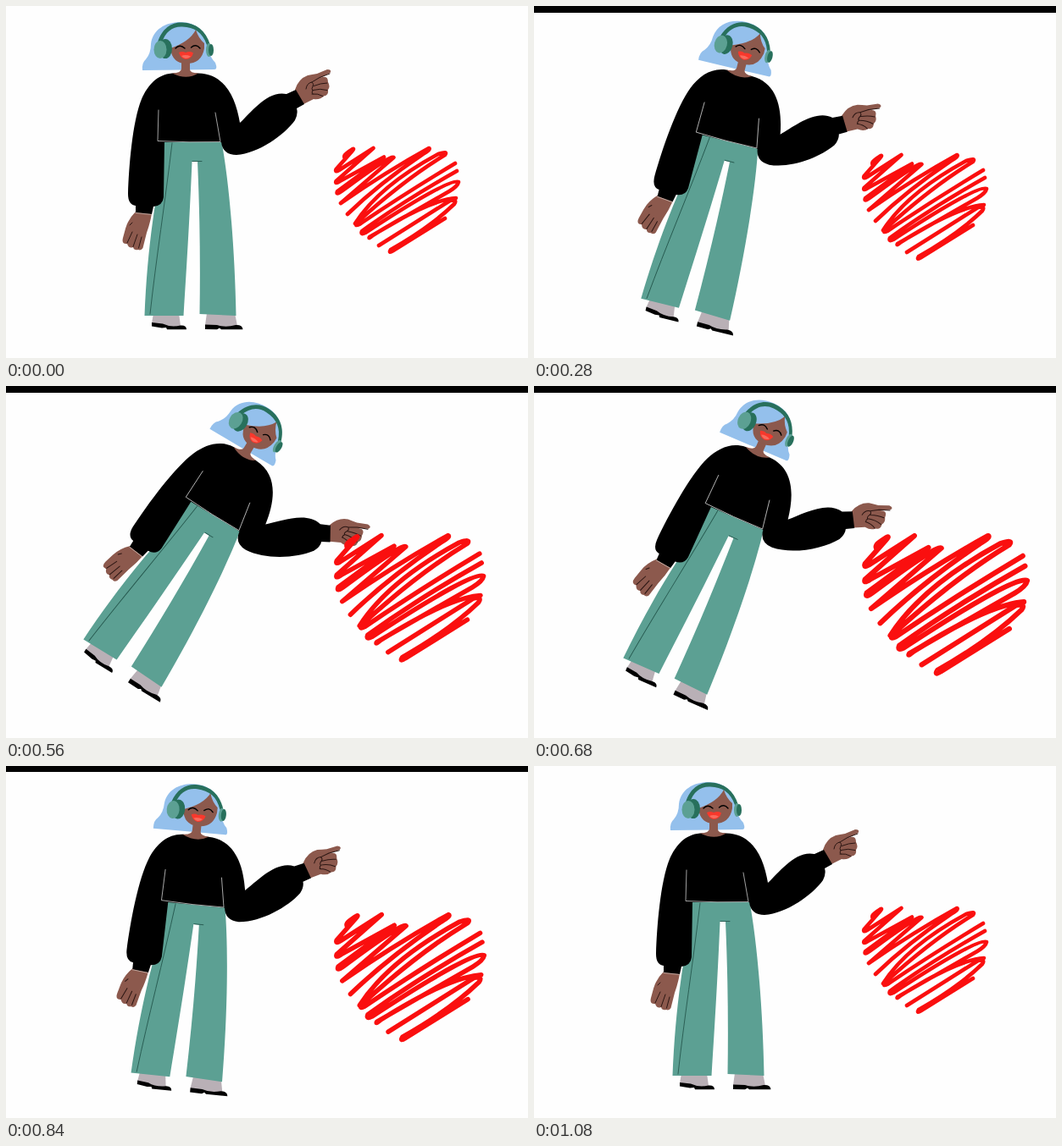
An HTML page for the animation above (1.12 s loop, 616 px wide and 416 px high).

```html
<!DOCTYPE html>
<html lang="en">
<head>
<meta charset="utf-8">
<title>Pointing at a heart</title>
<style>
  html, body { margin: 0; width: 100%; height: 100%; overflow: hidden; background: #000; }
  svg { display: block; width: 616px; height: 416px; }
  .line { fill: none; stroke: #2a1512; stroke-width: 1; stroke-linecap: round; stroke-linejoin: round; }
  .skin { fill: #8c594d; }
  .hair { fill: #94c0ec; }
  .dark { fill: #28705c; }
  .cloth { fill: #5ca093; }
  .ankle { fill: #b9b0b6; }
</style>
</head>
<body>
<svg viewBox="0 0 616 416">
  <g id="page">
    <rect width="616" height="416" fill="#fefefe"/>
    <g id="woman">
      <!-- shoes -->
      <path class="ankle" d="M174 363 L172 375 Q190 382 206 378 L204 363Z M237 363 L235 377 Q256 381 273 378 L270 363Z"/>
      <path d="M172 374 L185 375.5 Q194 380 206 377.5 Q213 377 213 382.3 L190 382.3 L189 380 L184 380.5 L172 378.5Z"/>
      <path d="M235 376.5 L249 377 Q259 380.5 271 377 Q279 376.5 279.5 382.3 L254 382.3 L252 380.5 L249 382.3 L235 382Z"/>
      <!-- trousers -->
      <path class="cloth" d="M186 158 L254 158 C263 205 270 285 271.5 366 L228.5 364 C229.5 300 228.5 240 226 184 L219.5 184 C217 245 213 310 209.5 366 L163.5 366 C166 300 174 235 185 190Z"/>
      <path class="line" style="stroke:#26594f;stroke-width:.9" d="M196 162 C188 230 177 300 170 364 M220 183.5 H231"/>
      <!-- hands -->
      <path class="skin" d="M153 243 L172 245 Q170 257 166 268 L161.5 286 Q159.5 289.5 156 288 Q151 289 150 285 Q145 287 143 281 Q136 282 138 274 L141 263 Q144 252 153 243Z"/>
      <path class="line" d="M143 280 L149 267 M150 284.5 L155 270 M156.5 286 L160 273 M146 259 L149 256"/>
      <path class="skin" d="M341 99 Q345 86 356 82 Q361 81 367 80 L379 75 Q385 75 382.5 79 L371 85 Q380 81 380 90 Q383 95 380 99 Q381 106 375 106.5 Q371 111 363 110 L351 116Z"/>
      <path class="line" d="M354 98 Q355 91 361 90 L370 84.5 L382 80 M363 94.5 Q372 91 379 91 M362 99.5 Q371 97 379 99.5 M361 104 Q368 103 374 106.5 M361 90 Q364 92 362 95 Q360 98 362 100 Q360 102 362 104"/>
      <!-- sweater -->
      <path d="M196 79.5 C178 81 167 94 160 110 C149 137 145 190 144 222 Q144 235 153 236 L153 244 L172 246 L174 237 Q185 236 186 226 L187 161 L254 161 Q256 176 272 176 C298 174 328 153 341 135 Q345 127 343 121 L352 116 L342 99 L331 104 C309 99 289 126 276 138 C271 108 258 80 227 79.5Z"/>
      <path class="line" style="stroke:#c9c9c9;stroke-width:.8" d="M180 123 L179 159.5 Q216 161.5 253 160.5 L247 126"/>
      <path class="line" style="stroke:#c9b5ae;stroke-width:.8" d="M153 244.5 L172 246.5"/>
      <!-- head -->
      <path class="hair" d="M161 76 Q160 67 165 63 Q171 56 171 45 C173 28 188 19 206 19 C225 19 240 32 240 53 Q241 61 247 67 Q250 75 246 75 L207 75.5Z"/>
      <path class="skin" d="M196 79.5 Q207 79 207 74 L207 66 H217 L217 75 Q217 79 227 79.5 Q213 88 196 79.5Z"/>
      <path class="skin" d="M224 28 Q227 38 234 44 L234 50 Q231 68 213 68 Q196 68 194 50 Q217 42 224 28Z"/>
      <path class="dark" d="M179 43 C184 26 196 19 208 19.5 C224 20 236 29 241 46 L237 46 C232 31 222 25 208 24.5 C196 24 188 31 184 43Z"/>
      <ellipse class="dark" cx="188" cy="50.5" rx="8" ry="11.5"/>
      <ellipse class="cloth" cx="182" cy="51.5" rx="7.5" ry="10.5"/>
      <ellipse class="cloth" cx="239.5" cy="52" rx="3.5" ry="8"/>
      <ellipse class="dark" cx="242" cy="52" rx="3" ry="7"/>
      <path class="line" style="stroke:#000;stroke-width:1.4" d="M200 50 Q205 44.5 211 50 M218.5 49 Q224 44 229 50"/>
      <path fill="#f8382c" d="M204 55 Q208 53 212 55 Q217 53 221 55.5 Q219 63 212 63 Q206 62 204 55Z"/>
      <path fill="#fa6a5c" d="M207 59 Q212 57 218 59.5 Q215 62 212 62 Q209 61.5 207 59Z"/>
    </g>
    <path id="heart" fill="none" stroke="#fa0f0f" stroke-width="4.6" stroke-linecap="round" stroke-linejoin="round"
      d="M400 180 Q398 177 402 174 Q414 165 408 172 L389.5 193 Q388 197 393 194 L433.5 168 L389.5 207 Q388 211 394 207 L446 178.5 L391 219 Q389 224 396 219 Q455 175 457.5 179 L395 233
         Q450 195 499 168 Q502 169 492 175 Q440 210 403 246 M412 257 Q440 213 510 175 Q522 171 518 176 Q470 205 414 256 Q411 261 417 258 Q470 222 530 186
         M532 195 Q470 230 420 266 Q418 271 424 268 Q525 202 534 208 Q533 213 523 219 L429 273 Q427 276 433 271 Q500 229 531 227 M440 283 L524 230 Q533 228 529 234 Q500 262 454 288 Q451 293 457 289 L518 251"/>
  </g>
</svg>
<script>
const FRAME = 40, COUNT = 28;
const part = id => document.getElementById(id);

// Smooth, overshoot-free curve through [frame, value] keys.
function track(keys) {
  const steep = n => (keys[n + 1][1] - keys[n][1]) / (keys[n + 1][0] - keys[n][0]);
  const slope = n => {
    if (n === 0 || n === keys.length - 1) return 0;
    const a = steep(n - 1), b = steep(n);
    return a * b > 0 ? 2 * a * b / (a + b) : 0;
  };
  return x => {
    let n = 0;
    while (n < keys.length - 2 && x > keys[n + 1][0]) n++;
    const [x0, y0] = keys[n], [x1, y1] = keys[n + 1];
    const w = x1 - x0, u = (x - x0) / w, v = 1 - u;
    return y0 * v * v * (1 + 2 * u) + y1 * u * u * (1 + 2 * v)
      + w * u * v * (slope(n) * v - slope(n + 1) * u);
  };
}

const lean = track([[0, 0], [4, 5.3], [7, 14], [11, 29.3], [13.2, 32], [17, 23.6], [21, 5.7], [25, 0.3], [27, 0]]);
const swell = track([[0, 1], [11, 1], [14, 1.2], [17, 1.325], [21, 1.205], [25, 1.04], [27, 1]]);
const drop = x => Math.round(8 * (1 - (1 - 2 * x / 27) ** 4));

function draw() {
  const x = Math.floor(performance.now() / FRAME) % COUNT;
  part("page").setAttribute("transform", `translate(0 ${drop(x)})`);
  part("woman").setAttribute("transform", `rotate(${lean(x)} 260 200.5)`);
  part("heart").setAttribute("transform", `translate(386 165) scale(${swell(x)}) translate(-386 -165)`);
  requestAnimationFrame(draw);
}
draw();
</script>
</body>
</html>
```
